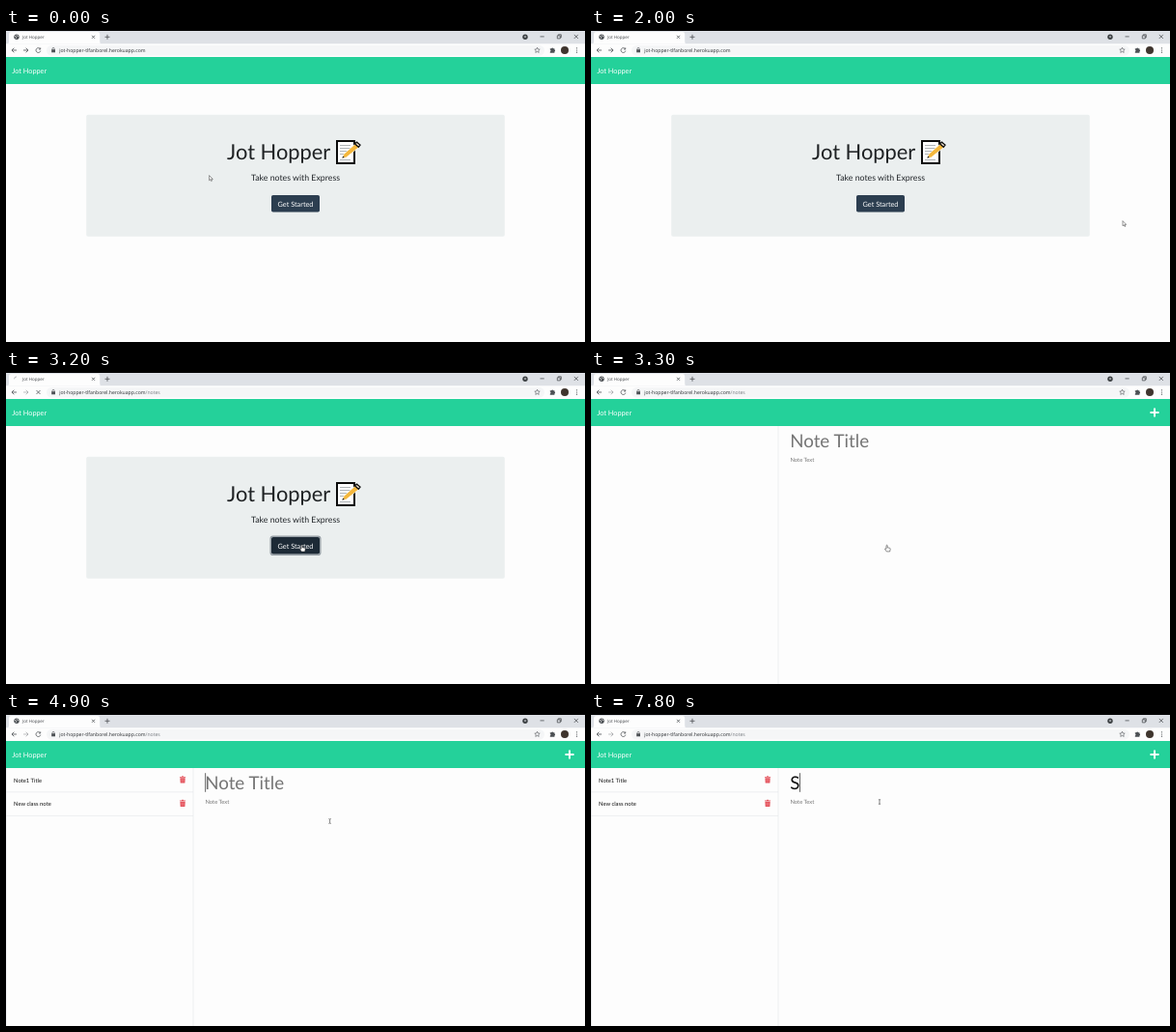
An HTML page for the animation above (8 s loop, 600 px wide and 325 px high).

```html
<!DOCTYPE html>
<html lang="en">
<head>
<meta charset="utf-8">
<title>Jot Hopper</title>
<style>
  html, body { margin: 0; width: 100%; height: 100%; overflow: hidden; background: #fdfdfd; }
  svg { display: block; width: 100%; height: 100%; }
  text { font-family: Lato, sans-serif; text-rendering: geometricPrecision; white-space: pre; }
  .ui { font-family: "Open Sans", sans-serif; }
  .icon { fill: none; stroke: #4c5054; stroke-width: .8; }
  .rule { fill: none; stroke: #dde1e5; stroke-width: .5; }
</style>
</head>
<body>
<svg viewBox="0 0 600 325">
  <defs>
    <g id="trash" fill="#e4505a">
      <path d="M0 .7H2L2.4 0H3.7L4.1 .7H6.1V1.5H0ZM.4 2H5.7L5.4 7.2H.7Z"/>
      <path d="M2 2.9V6.3M3.05 2.9V6.3M4.1 2.9V6.3" stroke="#f3a0a4" stroke-width=".4"/>
    </g>
  </defs>

  <!-- page -->
  <rect width="600" height="325" fill="#fdfdfd"/>
  <rect y="30" width="600" height="28" fill="#24d19a"/>
  <text x="6.25" y="46.8" font-size="7.32" fill="#fff">Jot Hopper</text>

  <g id="home">
    <rect x="83.2" y="89.8" width="433.6" height="126" rx="1.8" fill="#ebefef"/>
    <text x="229.1" y="136.3" font-size="21.875" fill="#1f2224">Jot Hopper</text>
    <g id="memo">
      <rect x="343" y="117" width="18" height="23" fill="#fff" stroke="#0b0b0b" stroke-width="2"/>
      <path d="M346 121.5H357M346 124.5H357M346 127.5H354M346 130.5H351M346 136.5H357" stroke="#9aa0a4" stroke-width=".8"/>
      <path d="M348.5 134.5 350 130.5 362.5 119.5 366.5 121.5 365 124 352.5 134Z" fill="#f4b73c" stroke="#fff" stroke-width=".7"/>
      <path d="M361.5 119.8 363.5 118.2 367 121 365.3 123.3Z" fill="#f5e6d0" stroke="#0b0b0b" stroke-width="1.3"/>
      <path d="M348.3 134.8 349.2 132.4 350.8 134Z" fill="#222"/>
    </g>
    <text x="300" y="158.3" font-size="8.79" fill="#212529" text-anchor="middle">Take notes with Express</text>
    <rect id="ring" x="274.2" y="172.2" width="51.6" height="19.2" rx="2.4" fill="none" stroke="#959da4" stroke-width="1.4"/>
    <rect id="button" x="275" y="173" width="50" height="17.6" rx="1.8"/>
    <text x="300" y="184.7" font-size="7.32" fill="#fff" text-anchor="middle">Get Started</text>
  </g>

  <g id="notes">
    <path d="M584 40.2V47.8M580.2 44H587.8" stroke="#fff" stroke-width="2" stroke-linecap="round"/>
    <path class="rule" d="M.3 58V325M194 58V325"/>
    <g id="list">
      <path class="rule" d="M0 82.8H194M0 107.4H194"/>
      <g font-size="5.86" fill="#111">
        <text x="8" y="72.6">Note1 Title</text>
        <text x="8" y="97.3">New class note</text>
      </g>
      <use href="#trash" x="180" y="66.2"/>
      <use href="#trash" x="180" y="90.8"/>
    </g>
    <text id="title" x="206.2" y="80.2" font-size="18.75"></text>
    <text x="206.4" y="95.1" font-size="5.86" fill="#777">Note Text</text>
    <rect id="caret" y="63.2" width=".7" height="19.6" fill="#222"/>
  </g>

  <!-- browser frame -->
  <rect width="600" height="30" fill="#fdfdfd"/>
  <rect width="600" height="16.3" fill="#dee1e6"/>
  <rect width="600" height="3" fill="#000"/>
  <path d="M1.5 16.3Q3 16.3 3 14V6.2Q3 4 5.2 4H95Q97.2 4 97.2 6.2V14Q97.2 16.3 98.7 16.3Z" fill="#fdfdfd"/>
  <g id="globe">
    <circle cx="11" cy="9.3" r="2.7" fill="#4c5054"/>
    <path d="M9 8.3Q10.5 8.2 10.6 9.5T9.8 11M11.2 7.2Q11.2 8.4 12.9 8.7" stroke="#eee" stroke-width=".7" fill="none"/>
  </g>
  <path id="spinner" d="M8.6 9.3A2.4 2.4 0 0 1 11 6.9" fill="none" stroke="#9a9da1" stroke-width=".7"/>
  <text class="ui" x="17" y="10.9" font-size="4.5" fill="#45484c">Jot Hopper</text>
  <path class="icon" d="M89 7.8 92 10.8M92 7.8 89 10.8M105 6.8V11.8M102.5 9.3H107.5"/>
  <circle cx="538" cy="9.3" r="2.7" fill="#3c4043"/>
  <path d="M536.8 8.6H539.2L538 10.2Z" fill="#dee1e6"/>
  <path class="icon" d="M553.5 8.9H557.7M571.3 7.9H574.3V10.9H571.3ZM572.3 7.8V6.8H575.3V9.8H574.4M588.8 6.9 592.8 10.9M592.8 6.9 588.8 10.9"/>

  <rect x="42" y="18" width="516" height="10.4" rx="5.2" fill="#f5f6f7"/>
  <path class="icon" d="M11 23H6M8.3 20.7 6 23 8.3 25.3"/>
  <path id="forward" class="icon" d="M18 23H23M20.7 20.7 23 23 20.7 25.3"/>
  <path id="reload" class="icon" d="M35.3 21.5A2.4 2.4 0 1 0 35.8 23.6M35.7 20.4V22H34"/>
  <path id="stop" class="icon" d="M31.5 21 35.5 25M35.5 21 31.5 25"/>
  <path d="M47.2 22.2H51V25.3H47.2Z" fill="#4c5054"/>
  <path class="icon" d="M48 22.4V21.5A1.1 1.1 0 0 1 50.2 21.5V22.4" style="stroke-width:.6"/>
  <text class="ui" x="55.2" y="24.9" font-size="5.13" fill="#2c2f33">jot-hopper-tlfanborel.herokuapp.com<tspan id="path" fill="#777b80">/notes</tspan></text>
  <path class="icon" style="stroke-width:.6" d="M550.5 20.2 551.3 22 553.2 22.2 551.8 23.5 552.2 25.4 550.5 24.4 548.8 25.4 549.2 23.5 547.8 22.2 549.7 22Z"/>
  <path d="M563.8 21.3H565.2A1 1 0 0 1 567.1 21.3H568.4V22.6A1 1 0 0 1 568.4 24.5V25.7H563.8V24.4A1 1 0 0 0 563.8 22.5Z" fill="#4c5054"/>
  <circle cx="579" cy="23" r="4" fill="#3f352e"/>
  <g fill="#4c5054"><circle cx="591.5" cy="20.8" r=".6"/><circle cx="591.5" cy="23" r=".6"/><circle cx="591.5" cy="25.2" r=".6"/></g>

  <!-- pointers, hot spot at the origin -->
  <g id="pointer">
    <path id="arrow" d="M0 0V5.2L1.2 4.1 2 5.9 2.9 5.5 2.1 3.8H3.7Z" fill="#fff" stroke="#333" stroke-width=".5"/>
    <path id="hand" d="M-.6 .4Q0 -.4 .6 .4V2.6L3 3.1Q3.7 3.3 3.6 4L3.1 6.7H-.3L-2 4.3Q-2.1 3.4 -1.2 3.7L-.6 4.2Z" fill="#fff" stroke="#222" stroke-width=".5"/>
    <path id="beam" d="M-1.1 -2.4Q0 -2.4 0 -1.8Q0 -2.4 1.1 -2.4M0 -1.8V1.8M-1.1 2.4Q0 2.4 0 1.8Q0 2.4 1.1 2.4" fill="none" stroke="#333" stroke-width=".6"/>
  </g>
</svg>
<script>
const LOOP = 8000, STEP = 100;
const el = id => document.getElementById(id);
const show = (id, on) => { el(id).style.display = on ? '' : 'none'; };
const between = (v, a, b) => v >= a && v < b;

// [time, x, y]
const route = [
  [0, 210.6, 152.6], [800, 208.4, 154.2], [1500, 208.4, 154.2],
  [1600, 483, 188.5], [1700, 483, 188.5], [1800, 536, 204], [2000, 551, 199.6],
  [2600, 306.6, 181.2], [3600, 306.6, 181.2],
  [3900, 186.5, 97], [4200, 582, 42], [4500, 284, 74], [4700, 284, 74],
  [4900, 335.6, 113], [5100, 463, 173], [5700, 463, 173],
  [6000, 296, 63], [6300, 299, 93], [LOOP, 299, 93]
];

function pointerAt(t) {
  const i = route.findIndex(key => key[0] > t);
  const [t0, x0, y0] = route[i - 1], [t1, x1, y1] = route[i];
  const p = (t - t0) / (t1 - t0), e = p * p * (3 - 2 * p);
  return [x0 + (x1 - x0) * e, y0 + (y1 - y0) * e];
}

function render(t) {
  const [x, y] = pointerAt(t);
  const home = t < 3300, loading = between(t, 3000, 3300), focused = between(t, 2800, 3300);
  const typed = t >= 7800;
  const onButton = home && between(x, 275, 325) && between(y, 173, 190.6);

  show('home', home);
  show('notes', !home);
  show('list', t >= 3400);
  show('ring', focused);
  el('button').setAttribute('fill', onButton ? '#1d2a36' : '#2c3e50');

  show('path', t >= 3000);
  show('globe', !loading);
  show('spinner', loading);
  show('stop', loading);
  show('reload', !loading);
  el('spinner').setAttribute('transform', `rotate(${(t - 3200) * .5} 11 9.3)`);
  el('forward').style.opacity = t < 3000 ? 1 : .45;

  el('title').textContent = typed ? 'S' : 'Note Title';
  el('title').setAttribute('fill', typed ? '#111' : '#757575');
  el('caret').setAttribute('x', typed ? 216.2 : 206.4);
  show('caret', typed || between(t, 4800, 5300) || between(t, 5800, 6300) || between(t, 6800, 7400));

  const kind = home ? (onButton ? 'hand' : 'arrow')
    : t < 3700 || y < 58 || x < 200 ? 'hand' : 'beam';
  for (const id of ['arrow', 'hand', 'beam']) show(id, id === kind);
  el('pointer').setAttribute('transform', `translate(${x} ${y})`);
}

const start = performance.now();
function tick() {
  const t = (performance.now() - start) % LOOP;
  render(Math.floor(t / STEP) * STEP);
  requestAnimationFrame(tick);
}
tick();
</script>
</body>
</html>
```
